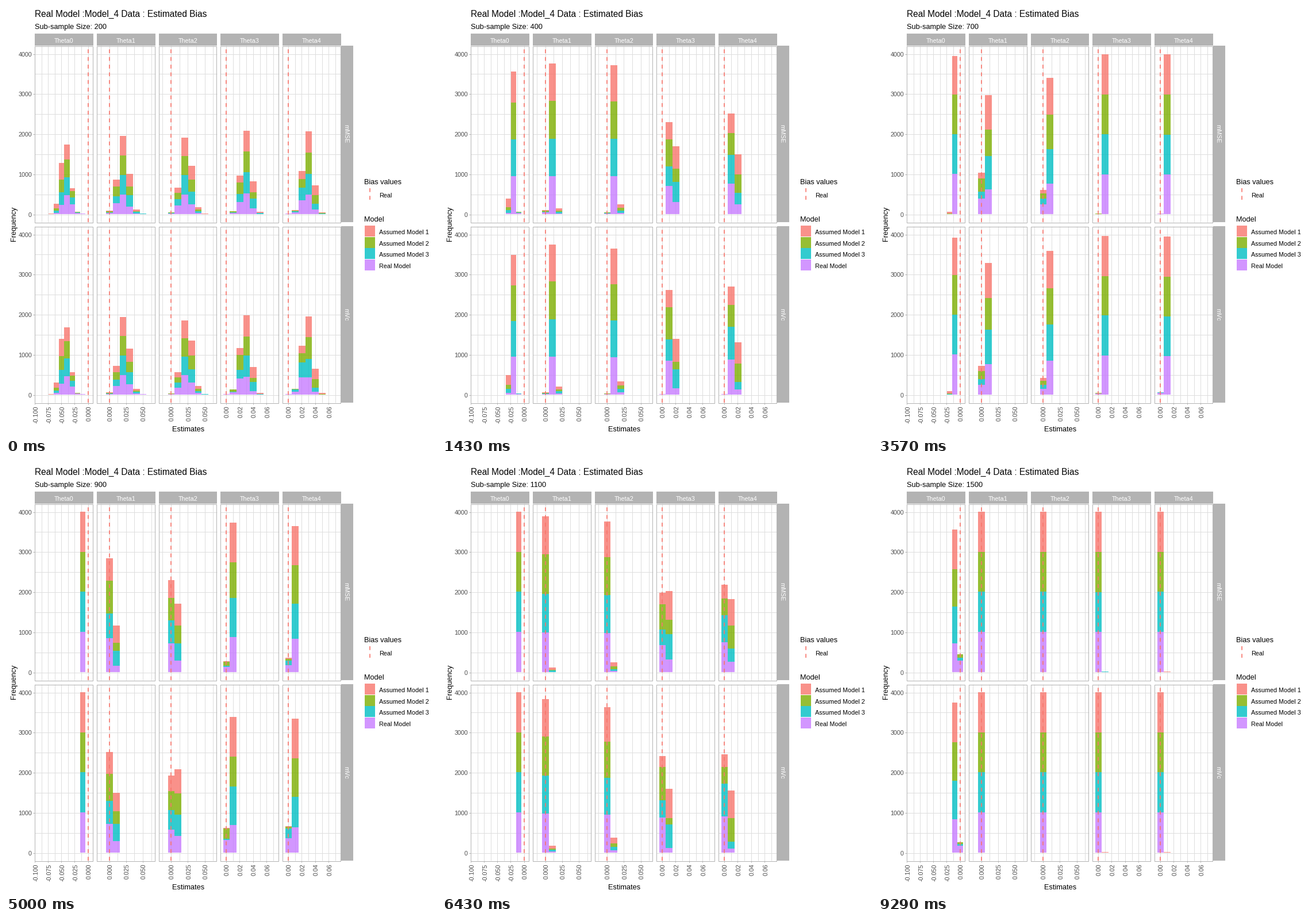
Write a matplotlib script that moves like this. It is 748 px wide and 748 px high and loops after 10 s.

```python
import math

import matplotlib.pyplot as plt
import numpy as np
from matplotlib.animation import FuncAnimation
from matplotlib.collections import LineCollection, PolyCollection
from matplotlib.patches import Rectangle

SIZE, DPI = 748, 100
LOOP, TICK = 10000, 50
SAMPLES = range(200, 1501, 100)
GREY, GRID, INK, RED = "#b3b3b3", "#dedede", "#4d4d4d", "#f8766d"
# Stacking order, bottom to top
MODELS = [("Real Model", "#c77cff"), ("Assumed Model 3", "#00bfc4"),
          ("Assumed Model 2", "#7cae00"), ("Assumed Model 1", RED)]
ROWS = [("mMSE", 362), ("mVc", 676)]     # name, baseline of the bars
PT = 72 / DPI
PX = 279 / 4000                          # pixels per count
BIN = 0.01
EDGES = (np.arange(11) - .5) * BIN

plt.rcParams["font.family"] = "Liberation Sans"


class Column:
    """One facet column. The estimates of each model are normal:
    n * mean = drift + offset - decay * n,  n * sd = floor + noise / n."""

    def __init__(self, i, zero, unit, ticks, grid, sign,
                 drift, decay, floor, noise, offsets, lean):
        self.name = f"Theta{i}"
        self.left = round(50.3 + 107.7 * i)
        self.right = round(151.9 + 107.7 * i)
        self.zero, self.unit = zero, unit
        self.ticks, self.grid, self.sign = ticks, grid, sign
        self.drift, self.decay = drift, decay
        self.floor, self.noise = floor, noise
        self.offsets, self.lean = np.array(offsets), lean

    def x(self, value):
        return self.zero + value * self.unit

    def counts(self, row, n):
        """Counts of 1000 estimates per model (rows) and bin (columns)."""
        weight = 1 + self.lean * (2 * row - 1)
        drift = self.drift[row] + weight * self.offsets - self.decay * (n - 200) / 1000
        sd = (self.floor + self.noise / n) / n
        table = [[normal((edge - d / n) / sd) for edge in EDGES] for d in drift]
        return np.round(1000 * np.diff(table))


def normal(z):
    return .5 + .5 * math.erf(z / math.sqrt(2))


def labels(start, stop, step, digits):
    return [f"{v:.{digits}f}" for v in np.arange(start, stop, step)]


LOW = labels(-.1, -.01, .025, 3) + ["0.000"]
MID = labels(0, .06, .025, 3)
FAR = labels(0, .07, .02, 2)
COLUMNS = [
    Column(0, 143, 924, LOW, .0125, -1,
           (8.52, 8.7), .05, .5, 220, (-.55, -.03, -.03, .63), -.07),
    Column(1, 180, 1172, MID, .0125, 1,
           (4.1, 4.3), .08, .55, 190, (-.25, .17, -.15, .25), -.3),
    Column(2, 287.5, 1172, MID, .0125, 1,
           (4.4, 4.58), .06, .55, 190, (-.24, 0, .03, .2), -.2),
    Column(3, 383.5, 1170, FAR, .01, 1,
           (5.9, 5.67), .44, .48, 180, (-.42, .28, -.32, .48), .27),
    Column(4, 491.5, 1170, FAR, .01, 1,
           (5.76, 5.6), .38, .48, 180, (-.47, -.28, .3, .45), .27),
]


def bars(n):
    """Rectangles of all panels, one list per model."""
    boxes = [[] for _ in MODELS]
    for col in COLUMNS:
        for row, (_, base) in enumerate(ROWS):
            for k, part in enumerate(col.counts(row, n).T):
                if not part.any():
                    continue
                tops = np.round(np.cumsum(part) * PX)
                if tops[-1] == 0:        # keep tiny bars visible
                    tops[part.argmax():] = 1
                mid = col.sign * k * BIN
                x0, x1 = (round(col.x(mid + s * BIN / 2)) for s in (-1, 1))
                low = 0
                for box, top in zip(boxes, tops):
                    if top > low:
                        y0, y1 = base - low, base - top
                        box.append([(x0, y0), (x1, y0), (x1, y1), (x0, y1)])
                    low = top
    return boxes


fig = plt.figure(figsize=(SIZE / DPI, SIZE / DPI), dpi=DPI, facecolor="white")
ax = fig.add_axes([0, 0, 1, 1])
ax.set_xlim(0, SIZE)
ax.set_ylim(SIZE, 0)
ax.axis("off")
grid, marks = [], []


def text(x, y, s, size=10.7, color="black", ha="left", rot=0):
    return ax.text(x, y, s, fontsize=size * PT, color=color, ha=ha, va="baseline",
                   rotation=rot, rotation_mode="anchor", zorder=6)


def rect(x0, y0, x1, y1, color, alpha=1):
    ax.add_patch(Rectangle((x0, y0), x1 - x0, y1 - y0, fc=color, lw=0,
                           alpha=alpha, antialiased=False, zorder=2))


def dashes(x, bottom, top):
    ax.plot([x, x], [bottom, top], color=RED, lw=1.67 * PT, ls=(0, (4, 4)),
            dash_capstyle="butt", zorder=4)


def half(v):
    return math.floor(v) + .5


def draw_panel(col, base):
    top, bottom = base - 293, base + 14
    for v in range(0, 4001, 500):
        y = half(base - v * PX)
        grid.append([(col.left, y), (col.right, y)])
    for k in range(-8, 9):
        x = half(col.x(k * col.grid))
        if col.left < x < col.right:
            grid.append([(x, top), (x, bottom)])
    dashes(col.zero, bottom, top)
    ax.add_patch(Rectangle((col.left + .5, top + .5), col.right - col.left - 1,
                           bottom - top, fill=False, ec=GREY, lw=PT, zorder=5))


for col in COLUMNS:
    for _, base in ROWS:
        draw_panel(col, base)
    rect(col.left, 48, col.right, 69, GREY)
    text((col.left + col.right) / 2, 63.5, col.name, color="white", ha="center")
    for label in col.ticks:
        x = col.x(float(label))
        marks.append([(half(x), 690), (half(x), 693)])
        text(x + 4.5, 695.5, label, color=INK, ha="right", rot=90)

for name, base in ROWS:
    rect(583, base - 293, 604, base + 14, GREY)
    text(588, base - 139.5, name, color="white", ha="center", rot=270)
    for v in range(0, 4001, 1000):
        y = half(base - v * PX)
        marks.append([(47, y), (50, y)])
        text(45, y + 4.3, str(v), color=INK, ha="right")

ax.add_collection(LineCollection(grid, colors=GRID, linewidths=PT, zorder=1))
ax.add_collection(LineCollection(marks, colors=GREY, linewidths=PT, zorder=1))

text(50.5, 19, "Real Model :Model_4 Data : Estimated Bias", 15.5)
subtitle = text(50.5, 40, "", 12.8)
text(317, 740, "Estimates", 12.8, ha="center")
text(17, 379, "Frequency", 12.8, ha="center", rot=90)

text(623, 310, "Bias values", 12.8)
dashes(633, 337, 317)
text(649, 333, "Real")
text(623, 375, "Model", 12.8)
for i, (name, color) in enumerate(reversed(MODELS)):
    y = round(382 + 19.7 * i)
    rect(624, y, 642, y + 19, color, alpha=.8)
    text(649, y + 15, name)

stacks = [PolyCollection([], facecolors=color, linewidths=0, alpha=.8,
                         antialiaseds=False, zorder=3) for _, color in MODELS]
for stack in stacks:
    ax.add_collection(stack, autolim=False)
STAGES = [bars(n) for n in SAMPLES]


def update(i):
    # A change that falls inside a tick shows from the start of that tick
    step = (i * TICK + TICK - 1) * len(SAMPLES) // LOOP
    subtitle.set_text(f"Sub-sample Size: {SAMPLES[step]}")
    for stack, boxes in zip(stacks, STAGES[step]):
        stack.set_verts(boxes)
    return [subtitle, *stacks]


anim = FuncAnimation(fig, update, frames=LOOP // TICK, interval=TICK,
                     init_func=lambda: update(0), repeat=True, repeat_delay=0)
plt.show()
```
